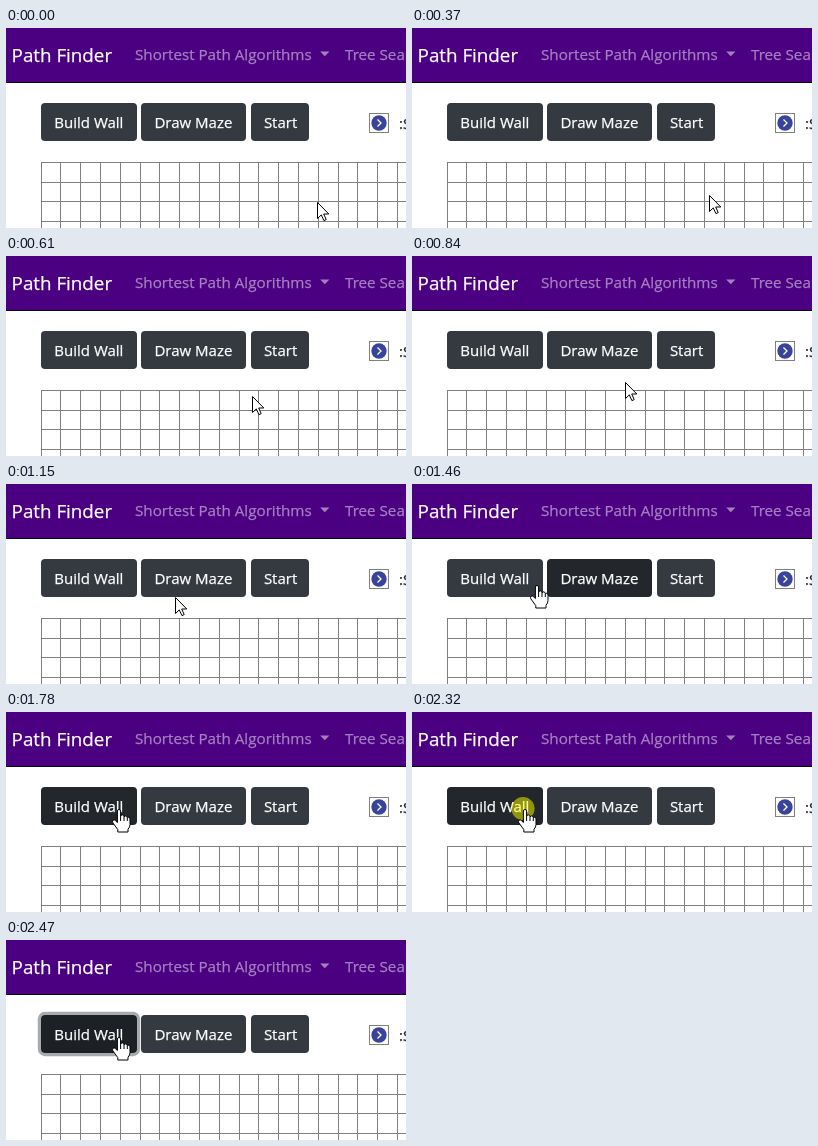
These frames come from a looping animation (400 by 200 pixels, 3250 ms). An HTML page:

```html
<!DOCTYPE html>
<html lang="en">
<head>
<meta charset="utf-8">
<title>Path Finder</title>
<style>
  html, body { margin: 0; width: 100%; height: 100%; overflow: hidden; background: #fff; }
  svg { display: block; width: 400px; height: 200px; }
  text {
    font: 15px "Open Sans", "Noto Sans", sans-serif;
    white-space: pre; fill: currentColor; stroke: currentColor; stroke-width: .25px;
    color: #fff;
  }
  .brand { font-size: 18.8px; }
  .link { font-size: 15.2px; color: #a580c0; }
  .key { color: #212529; }
</style>
</head>
<body>
<svg viewBox="0 0 400 200">
  <rect width="400" height="54" fill="#4b0082"/>
  <rect y="54" width="400" height="1"/>
  <text class="brand" x="5.6" y="34">Path Finder</text>
  <text class="link" x="129" y="32">Shortest Path Algorithms</text>
  <path d="M314.2 23.6h9.2l-4.6 4.6z" fill="#a580c0"/>
  <text class="link" x="339" y="32">Tree Search</text>

  <rect id="ring" x="33.4" y="73.4" width="99.2" height="41.2" rx="5.6" fill="none" stroke="#52585d" stroke-width="3.2"/>
  <rect id="build" x="35" y="75" width="96" height="38" rx="4"/>
  <rect id="draw" x="135" y="75" width="105" height="38" rx="4"/>
  <rect x="245" y="75" width="58" height="38" rx="4" fill="#343a40"/>
  <text x="48.3" y="100">Build Wall</text>
  <text x="148.4" y="100">Draw Maze</text>
  <text x="257.9" y="100">Start</text>

  <rect x="363.5" y="85.5" width="19" height="19" fill="#fff" stroke="#808080"/>
  <circle cx="373" cy="95" r="7.7" fill="#38439b"/>
  <path d="M371.5 91.5l3.5 3.5-3.5 3.5" fill="none" stroke="#fff" stroke-width="1.3"/>
  <text class="key" x="393" y="101">:Start</text>

  <path id="grid" fill="none" stroke="#808080" shape-rendering="crispEdges"/>

  <circle id="click" cx="111" cy="96.6" r="11.6" fill="#ff0" fill-opacity=".5"/>
  <g fill="#fff" stroke="#000" stroke-linejoin="round">
    <path id="arrow" d="M.5 .5V16.5L4.3 12.9 6.9 18.6 9.2 17.6 6.7 12H11.8Z"/>
    <g id="hand">
      <path d="M-1.6 13.5V2Q-1.6 .5 0 .5T1.6 2V7.2Q2 5.7 3.5 5.9T5 7.6V8Q5.5 6.6 6.9 6.9T8.3 8.6V9Q9 7.8 10 8.2T11 10V15.5Q11 18 9 20.3V23H-1.2V20.6L-6.2 13.8Q-7 12 -5.8 11.2T-3.6 11.6Z"/>
      <path d="M1.6 7V12M5 8V12M8.3 9V12" fill="none"/>
    </g>
  </g>
</svg>
<script>
const LOOP = 3250, STEP = 75;
const OVER_DRAW = 1215, OVER_BUILD = 1455, PRESS = 2320;
const NORMAL = [52, 58, 64], HOVER = [35, 39, 43];
const HOME = [311, 174];

// Pointer glides; a higher power brakes harder at the end
const glides = [
  { start: 300, steps: 7, to: [224, 129], power: 1.1 },
  { start: 840, steps: 7, to: [147, 107], power: 1 },
  { start: 1380, steps: 6, to: [113, 97], power: 2.5 }
];

const $ = id => document.getElementById(id);
const clamp = v => Math.min(1, Math.max(0, v));
const stepsSince = (t, start) => Math.floor((t - start) / STEP);
const fade = (t, start) => clamp(stepsSince(t, start) / 2);
const shade = k => `rgb(${NORMAL.map((c, i) => Math.round(c + (HOVER[i] - c) * k))})`;
const show = (id, on) => $(id).setAttribute("visibility", on ? "visible" : "hidden");

function pointerAt(t) {
  return glides.reduce((from, { start, steps, to, power }) => {
    const progress = clamp((stepsSince(t, start) + 1) / steps);
    const k = 1 - (1 - progress) ** power;
    return from.map((v, i) => v + (to[i] - v) * k);
  }, HOME).map(Math.round);
}

function drawGrid() {
  let d = "";
  for (let x = 35; x < 400; x += 19.8) d += `M${Math.floor(x) + .5} 134V200`;
  for (let y = 134; y < 200; y += 19.5) d += `M35 ${Math.round(y) + .5}H400`;
  $("grid").setAttribute("d", d);
}

function render(t) {
  const pointing = t >= OVER_DRAW;
  show("arrow", !pointing);
  show("hand", pointing);
  $(pointing ? "hand" : "arrow").setAttribute("transform", `translate(${pointerAt(t)})`);
  $("draw").setAttribute("fill", shade(fade(t, OVER_DRAW) - fade(t, OVER_BUILD)));
  $("build").setAttribute("fill", shade(fade(t, OVER_BUILD) + .35 * fade(t, PRESS)));
  $("ring").setAttribute("stroke-opacity", .5 * fade(t, PRESS));
  show("click", t >= PRESS && t < PRESS + 2 * STEP);
}

drawGrid();
const origin = performance.now();
function tick() {
  render((performance.now() - origin) % LOOP);
  requestAnimationFrame(tick);
}
tick();
</script>
</body>
</html>
```
